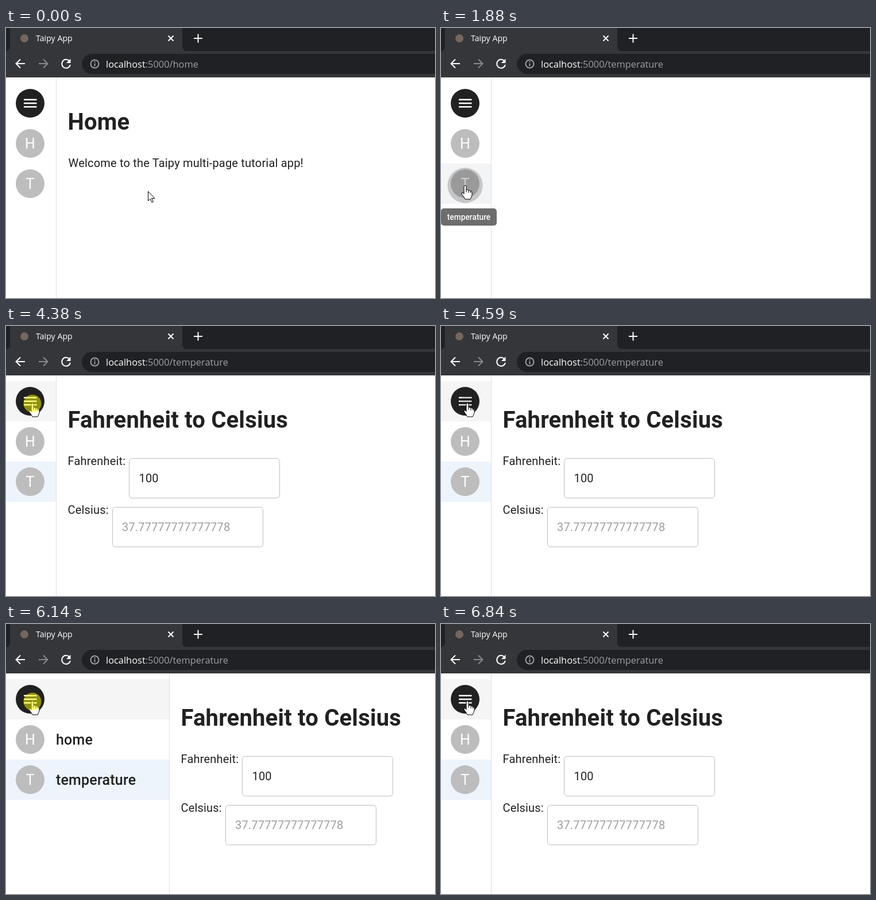
An HTML page for the animation above (7.43 s loop, 747 by 470 pixels).

```html
<!DOCTYPE html>
<html lang="en">
<head>
<meta charset="utf-8">
<title>Multi-page app</title>
<style>
  html, body { margin: 0; width: 100%; height: 100%; overflow: hidden; background: #fff; }
  #stage { display: block; font: 20px Roboto, sans-serif; fill: #212121; }
  .chrome { font-family: "Open Sans", sans-serif; fill: #fff; }
  .icon { fill: none; stroke: #fff; stroke-width: 2; }
  .page { letter-spacing: .19px; }
  .title { font-size: 40px; font-weight: 700; }
  .field { fill: none; stroke: #bdbdbd; }
  .initial { font-size: 25px; fill: #fff; text-anchor: middle; }
  .label { font-size: 25px; font-weight: 500; letter-spacing: .19px; }
  .tip { font-size: 13.75px; font-weight: 500; fill: #fff; text-anchor: middle; }
  .tip rect { fill: #616161; fill-opacity: .92; }
  .cursor { fill: #fff; stroke: #000; stroke-linejoin: round; }
</style>
</head>
<body>
<svg id="stage" width="747" height="470" viewBox="0 0 747 470">
  <g class="chrome">
    <rect width="747" height="86" fill="#35363a"/>
    <rect width="747" height="40" fill="#202124"/>
    <path d="M0 40Q7 40 7 32V0H307V32Q307 40 315 40Z" fill="#35363a"/>
    <circle cx="32" cy="18" r="7" fill="#75665e"/>
    <text x="52" y="23" font-size="14.2">Taipy App</text>
    <path class="icon" d="M282.5 13.5l9 9m0-9l-9 9M327 18h15M334.5 10.5v15"/>
    <path class="icon" d="M33 62H18M25 54.5L17.5 62L25 69.5"/>
    <path class="icon" d="M57 62H72M65 54.5L72.5 62L65 69.5" stroke="#88898c" style="stroke:#88898c"/>
    <path class="icon" d="M110 57A7.5 7.5 0 1 0 112 64"/>
    <path d="M112.5 53.5V61H105Z"/>
    <rect x="132" y="45" width="680" height="35" rx="17.5" fill="#202124"/>
    <g style="stroke:#9aa0a6" class="icon">
      <circle cx="154.500" cy="62.5" r="7"/>
      <path d="M154.500 61.500v5M154.500 58v2"/>
    </g>
    <text x="174" y="69" font-size="16.4">localhost<tspan id="path" fill="#9aa0a6"></tspan></text>
  </g>

  <g id="home" class="page">
    <text class="title" x="107.5" y="177">Home</text>
    <text x="108.500" y="242">Welcome to the Taipy multi-page tutorial app!</text>
  </g>
  <g id="temperature" class="page">
    <text class="title" x="107.5" y="177">Fahrenheit to Celsius</text>
    <text x="107.5" y="242">Fahrenheit:</text>
    <rect class="field" x="214.5" y="230.5" width="262" height="69" rx="5"/>
    <text x="231.5" y="272">100</text>
    <text x="107.5" y="327">Celsius:</text>
    <rect class="field" x="185.5" y="315.5" width="262" height="69" rx="5"/>
    <text x="202" y="357" fill="#9e9e9e">37.77777777777778</text>
  </g>

  <svg id="sidebar" height="470"></svg>
  <rect id="border" y="86" width="1" height="384" fill="#e0e0e0"/>

  <g class="tip" id="tipTemperature">
    <rect y="314" width="97" height="30" rx="5"/><text x="48.5" y="334">temperature</text>
  </g>
  <g class="tip" id="tipHome">
    <rect x="15" y="244" width="56" height="30" rx="5"/><text x="43" y="264">home</text>
  </g>

  <g id="pointer">
    <path id="arrow" class="cursor" d="M.5.5V17L4 13.500L7 19.5L9.5 18.5L6.5 12.500H12Z"/>
    <path id="hand" class="cursor" d="M-2 2Q-2 0 0 0T2 2V8Q3 7 5 8Q6 8 6.5 9Q8 8 9.5 10Q12 10 12 12V17Q11 20 9 24H0Q-2 20-6 15Q-6 12-4 12.500L-2 15ZM2 8V12M6 9V13M9.500 10V13"/>
    <circle id="press" cy="1" r="15.500" fill="#ff0" fill-opacity=".5"/>
  </g>
</svg>
<script>
const LOOP = 7430, NARROW = 88, WIDE = 285;
const $ = id => document.getElementById(id);
const set = (el, attrs) => { for (const k in attrs) el.setAttribute(k, attrs[k]); };
const show = (id, on) => $(id).style.display = on ? "" : "none";

const row = (y, color, icon, label) => `
  <svg y="${y}" width="100%" height="70">
    <rect class="hover" width="100%" height="70" fill="#000"/>
    <rect class="selected" width="100%" height="70" fill="#1976d2"/>
    <circle cx="42" cy="35" r="25" fill="${color}"/>${icon}
    <text class="label" x="87" y="44">${label}</text>
    <circle class="ripple" fill="#000"/>
  </svg>`;
const initial = c => `<text class="initial" x="42" y="44">${c}</text>`;
const bars = '<path d="M31 28.750h22.500M31 35h22.500M31 41.250h22.500" stroke="#fff" stroke-width="2.500"/>';
$("sidebar").innerHTML = `<rect y="86" width="100%" height="384" fill="#fff"/>`
  + row(96, "#212121", bars, "")
  + row(166, "#bdbdbd", initial("H"), "home")
  + row(236, "#bdbdbd", initial("T"), "temperature");
const [menuRow, homeRow, tempRow] = $("sidebar").querySelectorAll("svg");

// Cubic bezier easing from (0,0) to (1,1), solved by bisection
const bezier = (x1, y1, x2, y2) => x => {
  if (x <= 0) return 0;
  if (x >= 1) return 1;
  const at = (a, b, s) => 3 * (1 - s) * s * ((1 - s) * a + s * b) + s ** 3;
  let lo = 0, hi = 1;
  for (let i = 0; i < 20; i++) {
    const mid = (lo + hi) / 2;
    if (at(x1, x2, mid) < x) lo = mid; else hi = mid;
  }
  return at(y1, y2, lo);
};
const standard = bezier(.4, 0, .2, 1), sharp = bezier(.4, 0, .6, 1);
const ramp = (t, start, duration, ease = standard) => ease((t - start) / duration);
const pulse = (t, on, off, duration) => ramp(t, on, duration) - ramp(t, off, duration);

// time, x, y of the pointer hot spot
const pointerPath = [
  [790, 247, 284], [1130, 75, 268], [1340, 42, 274], [3400, 42, 274], [3430, 39, 251],
  [3480, 39, 249], [3620, 40, 211], [3880, 40, 211], [4130, 47, 108], [4340, 46, 134]
];
function pointerAt(t) {
  const i = pointerPath.findIndex(p => p[0] > t);
  if (i === 0) return pointerPath[0].slice(1);
  if (i < 0) return pointerPath.at(-1).slice(1);
  const [t0, x0, y0] = pointerPath[i - 1], [t1, x1, y1] = pointerPath[i];
  const k = (t - t0) / (t1 - t0);
  return [x0 + (x1 - x0) * k, y0 + (y1 - y0) * k];
}

const clicks = [
  { press: 1610, ripple: 1688, up: 1805, row: tempRow, x: 42, size: 61 },
  { press: 4380, ripple: 4460, up: 4565, row: menuRow, x: 45, size: 60 },
  { press: 6140, ripple: 6180, up: 6335, row: menuRow, x: 45, size: 244 }
];

function drawRow(el, hover, selected, t) {
  set(el.querySelector(".hover"), { opacity: hover * .04 });
  set(el.querySelector(".selected"), { opacity: selected });
  const click = clicks.findLast(c => c.row === el && t >= c.ripple);
  const grow = click ? ramp(t, click.ripple, 550) : 0;
  const fade = click ? 1 - ramp(t, click.up, 550) : 0;
  set(el.querySelector(".ripple"), {
    cx: click ? click.x : 0, cy: 38,
    r: click ? click.size * grow : 0,
    opacity: (.1 + .2 * grow) * fade
  });
}

function draw(t) {
  const open = ramp(t, 4590, 225, sharp) - ramp(t, 6335, 195, sharp);
  const width = NARROW + (WIDE - NARROW) * open;
  set($("sidebar"), { width });
  set($("border"), { x: Math.round(width) - 1 });
  set($("temperature"), { transform: `translate(${width - NARROW})` });

  const routed = t >= 1850;
  $("path").textContent = ":5000/" + (routed ? "temperature" : "home");
  show("home", !routed);
  show("temperature", t >= 2000);

  drawRow(menuRow, ramp(t, 3990, 150), 0, t);
  drawRow(homeRow, pulse(t, 3520, 3990, 150), 0, t);
  drawRow(tempRow, pulse(t, 1110, 1850, 150),
    .12 * ramp(t, 1850, 150) - .04 * ramp(t, 3520, 150), t);

  set($("tipTemperature"), { opacity: pulse(t, 1330, 3500, 130) });
  set($("tipHome"), { opacity: pulse(t, 3770, 3990, 140) });

  const [x, y] = pointerAt(t);
  set($("pointer"), { transform: `translate(${x} ${y})` });
  show("arrow", x >= NARROW);
  show("hand", x < NARROW);
  show("press", clicks.some(c => t >= c.press && t < c.up));
}

const start = performance.now();
function tick() {
  draw((performance.now() - start) % LOOP);
  requestAnimationFrame(tick);
}
tick();
</script>
</body>
</html>
```
